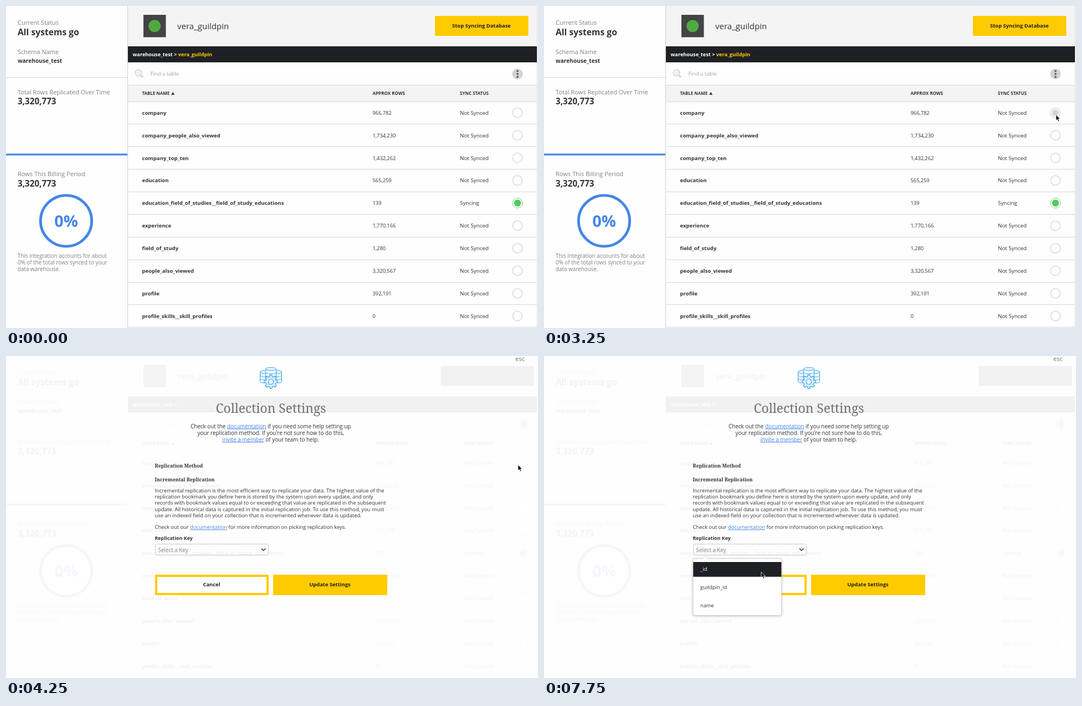
Animation of 960 by 583 pixels, one loop 8 s. Source, as an HTML page:

```html
<!DOCTYPE html>
<html lang="en">
<head>
<meta charset="utf-8">
<title>Replication settings</title>
<style>
  html, body { margin: 0; width: 100%; height: 100%; overflow: hidden; background: #fff; }
  svg { display: block; width: 100%; height: 100%; }
  text { font-family: "Open Sans", "Noto Sans", sans-serif; white-space: pre; }
  .serif { font-family: "Noto Serif", serif; }
  .bold { font-weight: 700; }
  .link { fill: #4486e8; text-decoration: underline; }
  .shadow { filter: drop-shadow(0 1px 2px rgba(0, 0, 0, .25)); }
  #page.ghost { opacity: .06; }
  #page.ghost.faint { opacity: .03; }
  #page.ghost .cta { fill: #333; }
  #page.ghost .accent { display: none; }
  #page.ghost .active { filter: grayscale(1); }
  #page.ghost .shift6 { transform: translateX(6px); }
  #page.ghost .shift8 { transform: translateX(8px); }
  #page.ghost .shift10 { transform: translateX(10.5px); }
</style>
</head>
<body>
<svg id="stage" viewBox="0 0 960 583" preserveAspectRatio="none"></svg>
<script>
const INK = '#333', GREY = '#808080', BLUE = '#4486e8', YELLOW = '#ffcb00', DARK = '#1f2024', LINE = '#d6d6d6';

const text = (x, y, str, size, fill = INK, cls = '', extra = '') =>
  `<text x="${x}" y="${y}" font-size="${size}" fill="${fill}" class="${cls}" ${extra}>${str}</text>`;
const bold = (x, y, str, size, fill = INK) => text(x, y, str, size, fill, 'bold');
const mid = (x, y, str, size, fill, cls) => text(x, y, str, size, fill, cls, 'text-anchor="middle"');
const lines = (x, y, step, size, fill, rows) => rows.map((row, i) => text(x, y + i * step, row, size, fill)).join('');
const rect = (x, y, w, h, fill, extra = '') =>
  `<rect x="${x}" y="${y}" width="${w}" height="${h}" fill="${fill}" ${extra}/>`;
const circle = (x, y, r, fill, stroke = 'none', w = 1) =>
  `<circle cx="${x}" cy="${y}" r="${r}" fill="${fill}" stroke="${stroke}" stroke-width="${w}"/>`;
const path = (d, fill, stroke = 'none', w = 1) =>
  `<path d="${d}" fill="${fill}" stroke="${stroke}" stroke-width="${w}"/>`;
const group = (attrs, ...parts) => `<g ${attrs}>${parts.join('')}</g>`;
const link = str => `<tspan class="link">${str}</tspan>`;

const ring = (x, y) => circle(x, y, 8.7, '#fff', '#e1e1e1', 2);
const activeRing = (x, y) =>
  group('class="active"', circle(x, y, 9, '#fff', '#7ad580'), circle(x, y, 6.3, '#55c85c'));

// Main page
const sidebar = () => [
  text(21, 34, 'Current Status', 11, GREY),
  bold(21, 53, 'All systems go', 15.7),
  text(21, 87, 'Schema Name', 11, GREY),
  bold(21, 103, 'warehouse_test', 10.2),
  rect(0, 129, 219, 1, LINE),
  text(21, 159.5, 'Total Rows Replicated Over Time', 11, GREY),
  bold(21, 178.3, '3,320,773', 15.2),
  rect(0, 267.3, 219, 3.2, BLUE),
  text(21, 308, 'Rows This Billing Period', 11.1, GREY),
  bold(21, 327, '3,320,773', 15.2),
  circle(108.5, 389, 46.2, '#fff', BLUE, 4.8),
  mid(108.5, 399.5, '0%', 29, BLUE, 'bold'),
  lines(21, 455.5, 12, 9.9, GREY, [
    'This integration accounts for about',
    '0% of the total rows synced to your',
    'data warehouse.'])
].join('');

const magnifier = (id, stroke, fill, handle) => group(`id="${id}"`,
  path('M243.5 125.5L247 129', 'none', handle, 3),
  circle(239, 121, 5.9, fill, stroke, 1.2),
  path('M235.5 121a3.6 3.6 0 0 1 3.6 -3.6', 'none', '#fff', 1.2));

const header = () => [
  rect(220, 0, 738, 73, '#f4f4f4'),
  rect(248, 16, 40.5, 40.5, '#444345'),
  group('class="accent"', circle(268.2, 36.2, 11, '#4faa41')),
  text(309, 41.5, 'vera_guildpin', 15),
  group('class="shift10"',
    rect(774, 18, 168.5, 36, YELLOW, 'class="cta"'),
    mid(858, 39.3, 'Stop Syncing Database', 9.4, DARK, 'bold accent')),
  rect(220, 73, 738, 29, DARK),
  bold(228.5, 91, `warehouse_test &gt; <tspan class="accent" fill="${YELLOW}">vera_guildpin</tspan>`, 9.2, '#fff'),
  magnifier('lensOff', '#cfcfcf', '#f0f0f0', '#d2d2d2'),
  magnifier('lensOn', '#2aa3ec', '#d3eefd', '#1b8fe0'),
  text(260.5, 126.3, 'Find a table', 9.5, '#a3a3a3'),
  group('class="shift10"', circle(923, 123, 9.6, '#d2d2d2'),
    ...[117.8, 123, 128.2].map(y => circle(923, y, 1.8, '#555'))),
  rect(220, 143, 738, 30, '#f4f4f4'),
  rect(220, 143, 738, 1, LINE),
  rect(220, 173, 738, 1, LINE),
  bold(245.5, 161.3, 'TABLE NAME', 7.95),
  path('M298 160.8h6.2l-3.1 -5z', INK),
  group('class="shift6"', bold(661.5, 161.3, 'APPROX ROWS', 8.05)),
  group('class="shift8"', bold(819, 161.3, 'SYNC STATUS', 8.05))
].join('');

const tables = [
  ['company', '966,782'],
  ['company_people_also_viewed', '1,734,230'],
  ['company_top_ten', '1,432,262'],
  ['education', '565,259'],
  ['education_field_of_studies__field_of_study_educations', '139', 'Syncing'],
  ['experience', '1,770,166'],
  ['field_of_study', '1,280'],
  ['people_also_viewed', '3,320,567'],
  ['profile', '392,191'],
  ['profile_skills__skill_profiles', '0']
];

const tableRow = ([name, count, status], i) => {
  const y = 193.2 + i * 40.9;
  return [
    bold(245.5, y + 3.5, name, 9.6),
    group('class="shift6"', text(661.5, y + 3.5, count, 9.3)),
    group('class="shift8"', text(819, y + 3.5, status || 'Not Synced', 9.85)),
    group('class="shift10"', (status ? activeRing : ring)(923, y)),
    rect(220, Math.round(y + 20), 738, 1, LINE)
  ].join('');
};

const page = group('id="page"',
  rect(0, 0, 960, 583, '#fefefe'), sidebar(), header(), tables.map(tableRow).join(''),
  group('id="hoverDot"', circle(923, 193.2, 6, '#d6d6d6')),
  rect(219, 0, 1, 583, '#cfcfcf'), rect(958, 0, 1, 583, '#d9d9d9'));

// Settings dialog
const gear = (cx, cy, teeth, inner, outer) => {
  const points = [];
  for (let i = 0; i < teeth; i++)
    for (const [offset, r] of [[-.34, inner], [-.2, outer], [.2, outer], [.34, inner]]) {
      const a = (i + offset) / teeth * 2 * Math.PI;
      points.push((cx + r * Math.cos(a)).toFixed(1) + ' ' + (cy + r * Math.sin(a)).toFixed(1));
    }
  return 'M' + points.join('L') + 'Z';
};

const drum = (x, y, w, h) => {
  const r = w / 2, arc = `a${r} 2.8 0 0 0 ${w} 0`;
  const bands = [1, 2].map(i => `M${x} ${y + h * i / 3}${arc}`).join('');
  return path(`M${x} ${y}v${h}${arc}v${-h}`, '#f2faff', '#3aa5ee') + path(bands, 'none', '#3aa5ee', .9) +
    `<ellipse cx="${x + r}" cy="${y}" rx="${r}" ry="2.8" fill="#e3f4ff" stroke="#3aa5ee"/>`;
};

const dialogIcon = drum(458.5, 29, 13, 17) + drum(484.5, 29, 13, 17) + drum(468.5, 23.5, 19, 18) +
  path(gear(478, 46.5, 8, 9.3, 12.3), '#d5eeff', '#2f9fec', 1.1) + circle(478, 46.5, 4.7, '#fff', '#2f9fec', 1.1);

const intro = [
  `Check out the ${link('documentation')} if you need some help setting up`,
  "your replication method. If you're not sure how to do this,",
  `${link('invite a member')} of your team to help.`
].map((row, i) => mid(477.7, 130.5 + i * 12, row, 9.9, INK)).join('');

const serifBold = (x, y, str, fill = INK) => text(x, y, str, 8.75, fill, 'serif bold');
const dialogTop = title => dialogIcon + mid(478, 102.5, title, 22.8, '#707070', 'serif') + intro +
  serifBold(268.5, 201.5, 'Replication Method');
const keyHint = (x, y) =>
  text(x, y, `Check out our ${link('documentation')} for more information on picking replication keys.`, 9.4);
const select = (x, y, w, label) =>
  rect(x + .5, y + .5, w - 1, 20, 'none', 'rx="3" stroke="#c8c8c8"') +
  text(x + 5.5, y + 14.5, label, 9.9, '#808080') +
  path(`M${x + w - 13} ${y + 8.5}l3.7 3.7 3.7 -3.7`, 'none', INK, 1.6);
const buttons = y =>
  rect(271, y + 2, 201, 33, '#fff', `stroke="${YELLOW}" stroke-width="4"`) +
  mid(371, y + 21, 'Cancel', 9.4, DARK, 'bold') +
  rect(482, y, 206, 37, YELLOW) +
  mid(584.5, y + 21, 'Update Settings', 9.4, DARK, 'bold');

const loading = group('id="loading"',
  group('opacity=".53"',
    dialogTop('Settings'),
    ring(278, 222.5),
    serifBold(294, 227, 'Incremental Replication'),
    serifBold(406, 227, 'Recommended', '#a24fd8'),
    lines(294, 246.8, 11.25, 9.4, INK, [
      'Incremental replication is the most efficient way to replicate your data. The highest value',
      'of the replication bookmark you define here is stored by the system upon every update,',
      'and only records with bookmark values equal to or exceeding that value are replicated in',
      'the subsequent update. All historical data is captured in the initial replication job. To use',
      'this method, your must contain an integer, timestamp or datetime column that is',
      'incremented whenever data is updated.']),
    keyHint(294, 324.5),
    bold(294, 345, 'Replication Key', 8.9),
    select(294, 351, 193, 'Select a'),
    activeRing(278, 395.3),
    serifBold(294, 399, 'Full Replication'),
    lines(294, 418.8, 11.25, 9.4, INK, [
      'Full Replication means that Lorvex will replicate the entire contents of a on every',
      'replication attempt. As this replication method can cause latency and quickly use up your',
      'monthly row-limit, we recommend using Incremental Replication if the in question',
      'contains any timestamped columns.']),
    buttons(500)),
  rect(451, 385.5, 64, 63.5, DARK));

const loaded = group('id="loaded"',
  dialogTop('Collection Settings'),
  serifBold(268.5, 227, 'Incremental Replication'),
  lines(268.5, 246.8, 11.25, 9.4, INK, [
    'Incremental replication is the most efficient way to replicate your data. The highest value of the',
    'replication bookmark you define here is stored by the system upon every update, and only',
    'records with bookmark values equal to or exceeding that value are replicated in the subsequent',
    'update. All historical data is captured in the initial replication job. To use this method, you must',
    'use an indexed field on your collection that is incremented whenever data is updated.']),
  keyHint(268.5, 313.2),
  bold(268.5, 333.4, 'Replication Key', 8.9),
  select(269, 340, 205, 'Select a Key'),
  buttons(396));

const menu = group('id="menu"',
  group('class="shadow"', rect(269, 367, 159.5, 102.5, '#fff', 'rx="3" stroke="#cfcfcf" stroke-width=".8"')),
  path('M285 367.4l5.5 -5 5.5 5', '#fff', '#cfcfcf', .8),
  rect(269.3, 373, 159, 26.7, DARK, 'id="pick"'),
  text(282, 389, '_id', 9.5, INK, '', 'id="pickLabel"'),
  text(282, 422.3, 'guildpin_id', 9.5),
  text(282, 454.6, 'name', 9.2));

const escLabel = text(919, 8.5, 'esc', 11.2, '#707070', '', 'id="esc"');
const cursor = group('id="cursor"',
  path('M0 0V10.4L2.4 8.2 4.1 12 5.9 11.2 4.2 7.5H7.5Z', '#000', '#fff', .8));

document.getElementById('stage').innerHTML = page + loading + loaded + escLabel + menu + cursor;

// Timeline: time in ms, pointer x, pointer y
const LOOP = 8000;
const pointer = [
  [1750, 640, 125], [2000, 806, 182], [2250, 872, 226], [2500, 906, 212], [2750, 924, 197],
  [4500, 830, 212], [4750, 713, 234], [5000, 640, 268], [5250, 560, 303], [5500, 490, 332],
  [5750, 438, 350], [6000, 414, 357], [7250, 405, 371], [7500, 395, 386], [7750, 392, 391]
];
const el = id => document.getElementById(id);
const show = (id, on) => { el(id).style.display = on ? '' : 'none'; };

function draw(t) {
  const between = (a, b = LOOP) => t >= a && t < b;
  const at = pointer.filter(step => step[0] <= t).pop();
  show('cursor', at);
  if (at) el('cursor').setAttribute('transform', `translate(${at[1]} ${at[2]})`);

  const lensOn = between(1750, 2500);
  show('lensOn', lensOn);
  show('lensOff', !lensOn);
  show('hoverDot', between(2750, 3500));

  const isLoading = between(3500, 4000);
  el('page').classList.toggle('ghost', t >= 3500);
  el('page').classList.toggle('faint', isLoading);
  show('esc', between(3500));
  show('loading', isLoading);
  show('loaded', between(4000));
  show('menu', between(6500));
  const picked = between(7250);
  show('pick', picked);
  el('pickLabel').setAttribute('fill', picked ? '#fff' : INK);
}

function tick() {
  draw(performance.now() % LOOP);
  requestAnimationFrame(tick);
}
tick();
</script>
</body>
</html>
```
